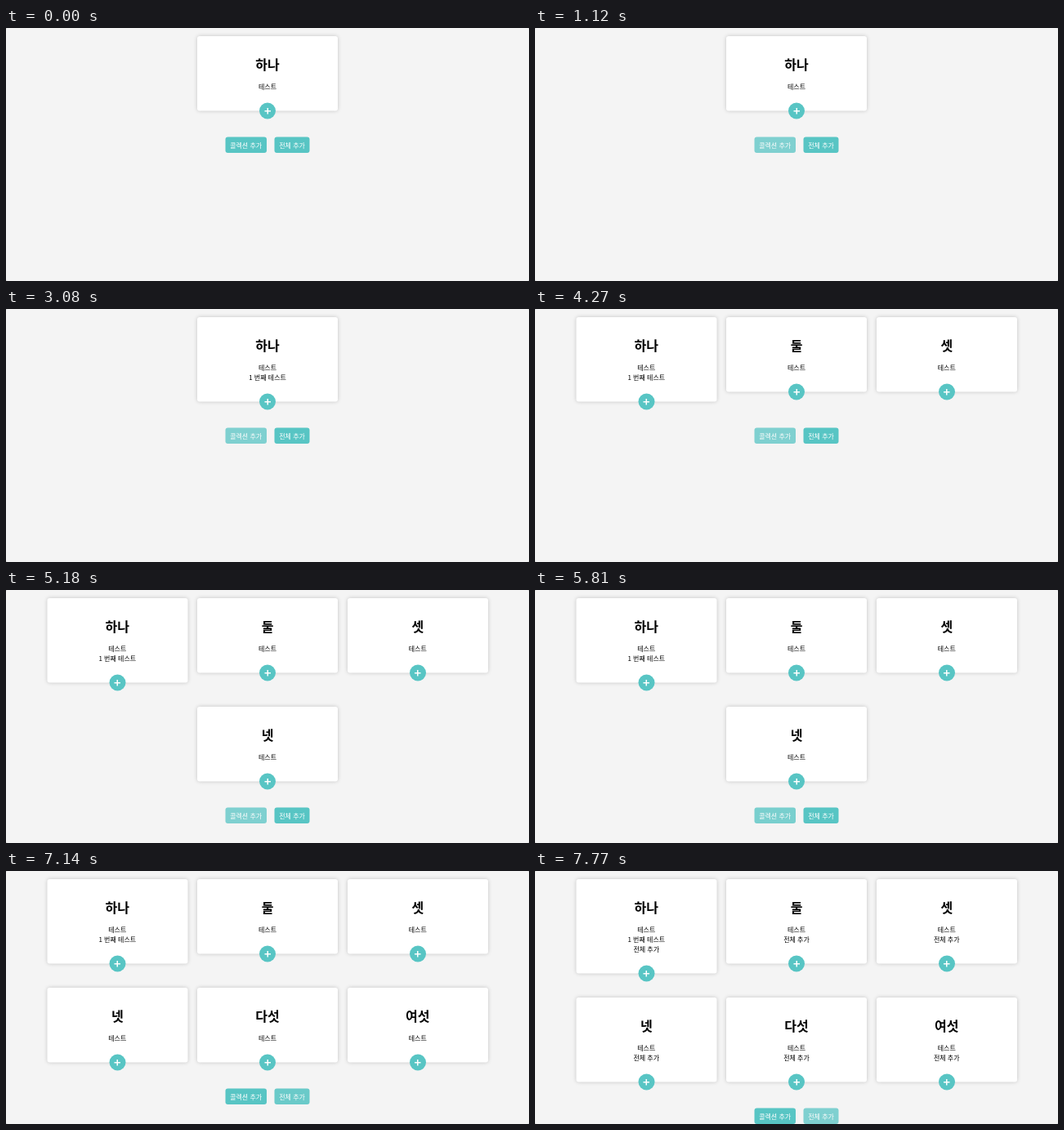
An HTML page for the animation above (8 s loop, 640 px wide and 310 px high).

```html
<!DOCTYPE html>
<html lang="ko">
<head>
<meta charset="utf-8">
<title>콜렉션</title>
<style>
  html, body {
    margin: 0;
    width: 100%;
    height: 100%;
    overflow: hidden;
    background: #d0d0d0;
  }
  /* Laid out at double size, shown at half */
  #stage {
    position: absolute;
    left: 0;
    top: 0;
    width: 1280px;
    height: 620px;
    overflow: hidden;
    transform: scale(.5);
    transform-origin: 0 0;
    border-radius: 4px;
    background: #f4f4f4;
    color: #000;
    font: 16px/24px "Noto Sans CJK KR", "Noto Sans KR", "Noto Sans CJK JP", sans-serif;
    text-align: center;
  }
  #cards {
    display: flex;
    flex-wrap: wrap;
    justify-content: center;
    align-items: flex-start;
    gap: 59px 23.5px;
    width: 1160px;
    margin: 20px auto 64px;
  }
  .card {
    position: relative;
    box-sizing: border-box;
    width: 344px;
    padding: 43px 0 48px;
    border-radius: 6px;
    background: #fff;
    box-shadow: 0 0 11px rgba(0, 0, 0, .2);
  }
  h1 {
    margin: 0 0 20px;
    font-size: 32px;
    line-height: 48px;
    font-weight: 700;
  }
  p { margin: 0; }
  [hidden] { display: none; }
  .plus, .button { background: #58c5c4; }
  .plus {
    position: absolute;
    left: 152px;
    bottom: -20px;
    width: 40px;
    height: 40px;
    border-radius: 50%;
  }
  .plus::before, .plus::after {
    content: "";
    position: absolute;
    left: 12.5px;
    top: 18.5px;
    width: 15px;
    height: 3px;
    background: #fff;
  }
  .plus::after { transform: rotate(90deg); }
  #buttons {
    display: flex;
    justify-content: center;
    gap: 19px;
  }
  .button {
    padding: 0 11.5px;
    border-radius: 6px;
    color: #fff;
    line-height: 39px;
    white-space: nowrap;
  }
</style>
</head>
<body>
<div id="stage">
  <div id="cards"></div>
  <div id="buttons">
    <div class="button" id="addCard">콜렉션 추가</div>
    <div class="button" id="addAll">전체 추가</div>
  </div>
</div>
<script>
const LOOP = 8000, FADE = 190, DIM = .25;
const titles = ['하나', '둘', '셋', '넷', '다섯', '여섯'];
const cardTimes = [0, 3430, 4270, 5180, 5950, 6580];
const itemTime = 2520, allTime = 7700;

const make = (parent, tag, text = '') => {
  const el = parent.appendChild(document.createElement(tag));
  el.textContent = text;
  return el;
};

const timed = [];
const showFrom = (el, time) => timed.push({ el, time });

titles.forEach((title, i) => {
  const card = make(document.getElementById('cards'), 'div');
  card.className = 'card';
  make(card, 'h1', title);
  make(card, 'p', '테스트');
  if (i === 0) showFrom(make(card, 'p', '1 번째 테스트'), itemTime);
  showFrom(make(card, 'p', '전체 추가'), allTime);
  make(card, 'div').className = 'plus';
  showFrom(card, cardTimes[i]);
});

// Pointer enter and leave times
const hovers = [
  { el: document.getElementById('addCard'), spans: [[650, 1630], [2890, 5270], [5690, 6110], [6390, 6810]] },
  { el: document.getElementById('addAll'), spans: [[1640, 1980], [7090, LOOP]] },
  { el: document.querySelector('.plus'), spans: [[2190, 2820]] }
];

const ease = (t, start) => {
  const p = Math.min(1, Math.max(0, (t - start) / FADE));
  return 1 - (1 - p) ** 2;
};

function draw(t) {
  for (const { el, time } of timed) el.hidden = t < time;
  for (const { el, spans } of hovers) {
    const level = spans.reduce((sum, [enter, leave]) => sum + ease(t, enter) - ease(t, leave), 0);
    el.style.opacity = 1 - DIM * level;
  }
}

const begin = performance.now();
function tick() {
  draw((performance.now() - begin) % LOOP);
  requestAnimationFrame(tick);
}
tick();
</script>
</body>
</html>
```
